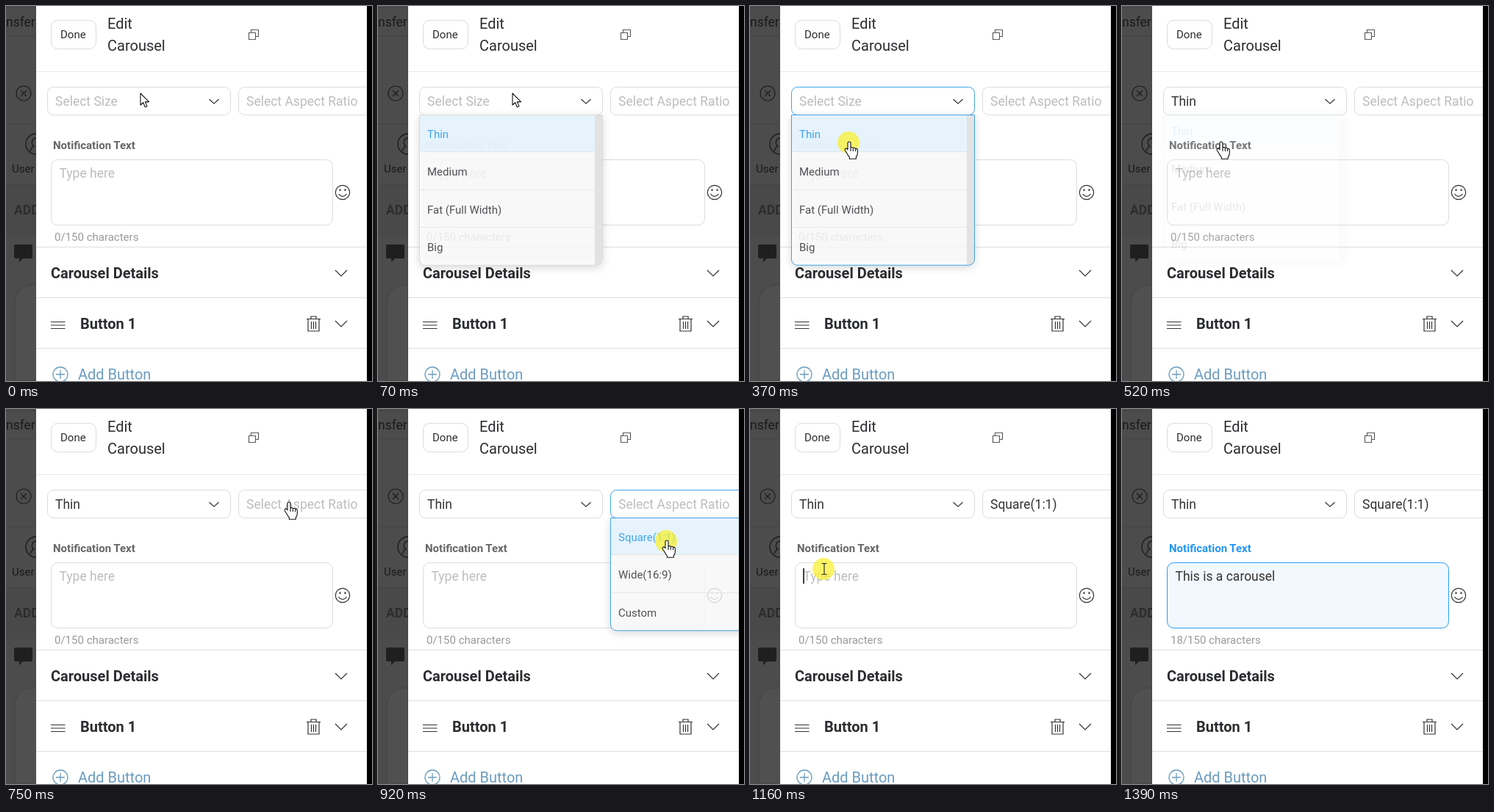
An HTML page for the animation above (1560 ms loop, 498x511 px).

```html
<!DOCTYPE html>
<html lang="en">
<head>
<meta charset="utf-8">
<title>Edit Carousel</title>
<style>
  html, body { margin: 0; width: 100%; height: 100%; overflow: hidden; background: #000; }
  svg { display: block; width: 498px; height: 511px; font-family: Roboto, sans-serif; }
  text { white-space: pre; }
  .line { fill: none; stroke: #333; stroke-width: 1.2; }
  .box { fill: #fff; stroke: #dcdcdc; }
  .rule { stroke: #dedede; fill: none; }
  .s { font-size: 15px; }
  .m { font-size: 17.5px; }
  .l { font-size: 20px; }
  .b { font-weight: 700; }
  .hint { fill: #bdbdbd; }
  .panel { fill: #2b2d30; }
  .shadow { filter: drop-shadow(0 3px 6px rgba(0, 0, 0, .2)); }
  .cursor { fill: #fff; stroke: #111; stroke-width: 1.1; stroke-linejoin: round; }
</style>
</head>
<body>
<svg viewBox="0 0 498 511">
  <!-- dimmed page behind the panel -->
  <rect width="41" height="511" fill="#4c4c4c"/>
  <g fill="none" stroke="#434343">
    <path d="M0 2.5H41M0 40.5H41M0 160.5H41M0 243.5H41"/>
    <rect y="244" width="41" height="70" fill="#494949" stroke="none"/>
    <path d="M41 380H36a24 24 0 0 0-24 24V511H41z" fill="#505050"/>
    <path d="M20 115l8 8m0-8l-8 8M34 119a10 10 0 1 1-20 0a10 10 0 1 1 20 0" stroke="#1d1d1d" stroke-width="1.2"/>
    <path d="M41 174a14 14 0 0 0 0 28M41 180a6 6 0 0 0-3 11q-4 2-5 7" stroke="#1d1d1d" stroke-width="1.4"/>
  </g>
  <path d="M13 325H34q2 0 2 2V342q0 2-2 2H23l-5 5v-5H13q-2 0-2-2V327q0-2 2-2z" fill="#1f1f1f"/>
  <g fill="#1a1a1a">
    <text x="0" y="28" class="m">nsfer</text>
    <text x="8" y="227" class="s">User</text>
    <text x="11" y="284" class="m b" fill="#2d2d2d">ADD</text>
  </g>

  <!-- panel -->
  <rect x="41" width="450" height="511" fill="#fff"/>
  <path class="rule" d="M41 89.5H491" stroke-opacity=".7"/>
  <path class="rule" d="M41 328.5H491M41 397.5H491M41 466.5H491"/>
  <rect class="box" x="61.5" y="19.5" width="61" height="39" rx="9"/>
  <g class="panel">
    <text x="74" y="44" class="s">Done</text>
    <text x="138" y="31" class="l">Edit</text>
    <text x="138" y="61" class="l">Carousel</text>
    <text x="61" y="371" class="l b">Carousel Details</text>
    <text x="101" y="440" class="l b">Button 1</text>
  </g>
  <path class="line" stroke-opacity=".8" d="M330.5 36.5h9v9h-9zM333.5 36v-3.500h10v9h-4"/>
  <path class="line" stroke-width="1.4" d="M448 360l8 8l8-8M448 429l8 8l8-8M61 430.500h19.500M61 435h19.500M61 439.500h19.500"/>
  <path class="line" d="M409 426.500h19M415 426v-3h7v3M411 427v16h15v-16M415.500 430v10M418.500 430v10M421.500 430v10"/>
  <g class="line">
    <circle cx="458" cy="254" r="9.700"/>
    <path d="M452.500 256q5.500 7 11 0"/>
    <path d="M454.500 249.500v2.500M461.500 249.500v2.500" stroke-width="2"/>
  </g>
  <g fill="none" stroke="#6a9cc0" stroke-width="1.3">
    <circle cx="74" cy="502" r="10"/>
    <path d="M74 496v12M68 502h12"/>
  </g>
  <text x="98" y="509" class="l" fill="#6a9cc0">Add Button</text>

  <!-- form -->
  <rect id="sizeBox" class="box" x="56.5" y="110.5" width="249" height="38" rx="8"/>
  <rect id="ratioBox" class="box" x="316.5" y="110.5" width="249" height="38" rx="8"/>
  <path class="line" d="M276.500 127l6.500 6l6.500-6"/>
  <text id="size" x="67" y="136" class="m"/>
  <text id="ratio" x="327" y="136" class="m"/>
  <text id="label" x="64" y="195" class="s b">Notification Text</text>
  <rect id="area" x="61.5" y="209.5" width="383" height="89" rx="9"/>
  <text id="note" x="72.500" y="234" class="m"/>
  <text id="count" x="66" y="320" class="s" fill="#9a9a9a"/>
  <path id="caret" d="M73 217V238" stroke="#111" stroke-width="1.6"/>

  <g id="sizeMenu"/>
  <g id="ratioMenu"/>
  <g id="pointer">
    <circle id="click" r="15" fill="#f8f032" fill-opacity=".75" cx="-1"/>
    <path id="arrow" class="cursor" d="M0 0V16l3.700-3.500l2.600 6.200l2.700-1.100l-2.600-6H11.500z"/>
    <path id="hand" class="cursor" d="M-2 1q0-2 2-2t2 2v7q0-1.500 1.600-1.500t1.700 1.500v.5q.2-1.300 1.600-1.200t1.600 1.400v.6q.3-1 1.400-.9t1.400 1.400v5q0 3-2 5v2.500h-9v-2.500q-2-2-4-6l-2-3q-.8-1.800 .6-2.500t2.600 .7l.5 .8zM2 8v4M5.300 9v3M8.500 10v2"/>
    <path id="beam" d="M-3.500-7.500h2.500l1 1l1-1h2.500M0-6.500v13M-3.500 7.500h2.500l1-1l1 1h2.500" fill="none" stroke="#333" stroke-width="1.2"/>
  </g>
  <rect x="491" width="7" height="511"/>
</svg>
<script>
const $ = id => document.getElementById(id);
const LOOP = 1560, BLUE = '#3fa4ec', GRAY = '#dcdcdc', INK = '#333';
const MESSAGE = 'This is a carousel';
const TICKS = [0, 70, 150, 220, 300, 370, 450, 520, 600, 680, 760, 840, 920, 1000, 1070, 1160, 1240, 1320, 1390];
// pointer path: time, x, y
const PATH = [[0, 183, 119], [70, 183, 119], [300, 135, 186], [520, 135, 186], [680, 385, 128],
  [760, 385, 128], [920, 393, 180], [1070, 393, 180], [1160, 101, 218], [LOOP, 101, 218]];

function buildMenu(id, x, items, scrollbar) {
  const bottom = 148 + items.length * 51.3, width = scrollbar ? 238 : 248;
  const body = `M${x} 148.5h249V${bottom - 8}a8 8 0 0 1-8 8h-233a8 8 0 0 1-8-8z`;
  const rows = items.map((item, i) => {
    const y = 148 + i * 51.3;
    return (i ? `<path d="M${x + 1} ${Math.round(y) - .5}h${width}" stroke="#e6e6e6"/>` : '') +
      `<text x="${x + 10.5}" y="${Math.round(y + 32)}" class="s" fill="${i ? '#505256' : BLUE}">${item}</text>`;
  }).join('');
  const bar = scrollbar ? `<path d="M${x + 238.5} 149h10V${bottom - 8}a8 8 0 0 1-8 8h-2z" fill="#e2e2e2"/>` : '';
  $(id).innerHTML = `<path class="shadow" d="${body}" fill="#fff" fill-opacity=".82"/>
    <path d="M${x + .5} 149h${width}v49.500h-${width}z" fill="#e3f2fe" fill-opacity=".85"/>
    ${bar}${rows}<path class="edge" d="${body}" fill="none"/>`;
}
buildMenu('sizeMenu', 56.5, ['Thin', 'Medium', 'Fat (Full Width)', 'Big'], true);
buildMenu('ratioMenu', 316.5, ['Square(1:1)', 'Wide(16:9)', 'Custom'], false);

const show = (id, on) => $(id).style.display = on ? '' : 'none';
const within = (t, from, to) => t >= from && t < to;

function setText(id, text, color) {
  $(id).textContent = text;
  $(id).style.fill = color;
}

function drawSelect(name, t, opened, picked, value, hint) {
  const focused = within(t, opened + 80, picked), edge = focused ? BLUE : GRAY;
  const menu = $(name + 'Menu'), fading = t >= picked;
  setText(name, fading ? value : hint, fading ? INK : '#bdbdbd');
  $(name + 'Box').style.stroke = edge;
  menu.querySelector('.edge').style.stroke = edge;
  show(name + 'Menu', within(t, opened, picked + 80));
  menu.setAttribute('opacity', fading ? .13 : 1);
  menu.setAttribute('transform', `translate(0 ${fading ? -4.5 : 0})`);
}

function drawPointer(t) {
  const i = PATH.findIndex(p => p[0] > t), [t0, x0, y0] = PATH[i - 1], [t1, x1, y1] = PATH[i];
  const k = (t - t0) / (t1 - t0);
  $('pointer').setAttribute('transform', `translate(${x0 + (x1 - x0) * k} ${y0 + (y1 - y0) * k})`);
  show('arrow', t < 150);
  show('hand', within(t, 150, 1160));
  show('beam', within(t, 1160, 1240));
  show('click', within(t, 370, 520) || within(t, 920, 1070) || within(t, 1160, 1240));
}

function draw(now) {
  const time = now % LOOP, t = TICKS.findLast(tick => tick <= time);
  drawSelect('size', t, 70, 520, 'Thin', 'Select Size');
  drawSelect('ratio', t, 760, 1070, 'Square(1:1)', 'Select Aspect Ratio');
  drawPointer(t);

  const typing = t >= 1240;
  const typed = MESSAGE.slice(0, Math.max(0, Math.round((t - 1160) / 230 * MESSAGE.length)));
  setText('note', typed || 'Type here', typed ? INK : '#bdbdbd');
  $('count').textContent = typed.length + '/150 characters';
  $('label').style.fill = typing ? '#2196f3' : '#666';
  $('area').style.fill = typing ? '#f1f8fe' : '#fff';
  $('area').style.stroke = typing ? '#2b9cf0' : GRAY;
  show('caret', t === 1160);
}

const start = performance.now();
function loop() {
  draw(performance.now() - start);
  requestAnimationFrame(loop);
}
loop();
</script>
</body>
</html>
```
